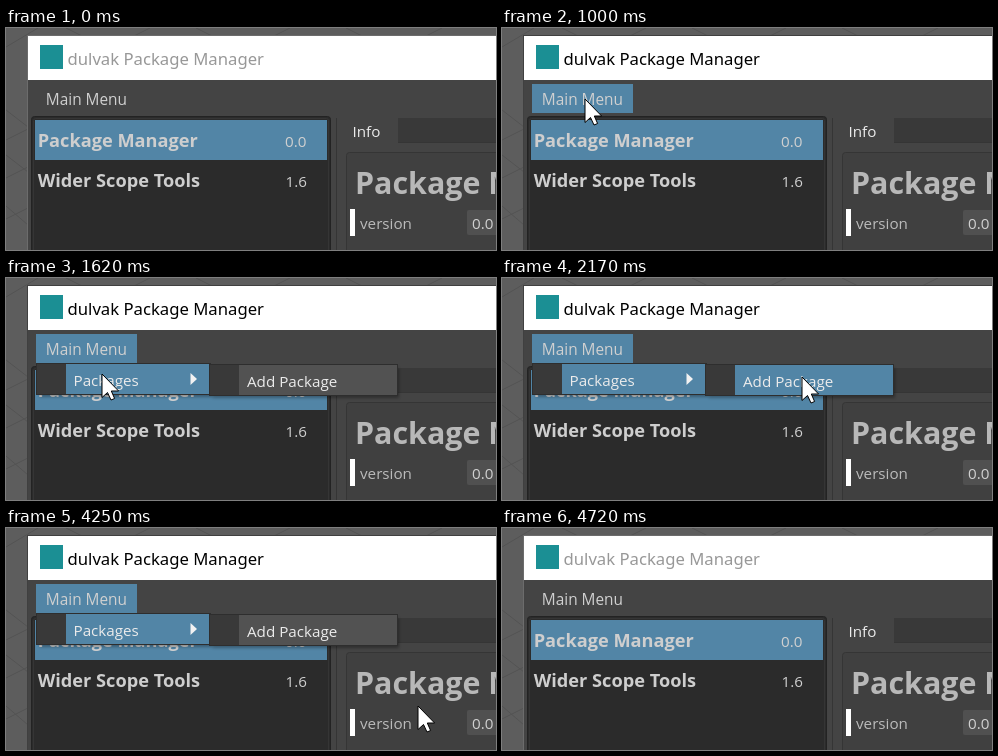
An HTML page that plays this animation: 490 px wide and 222 px high, repeating every 4800 ms.

```html
<!DOCTYPE html>
<html lang="en">
<head>
<meta charset="utf-8">
<title>Package Manager menu</title>
<style>
  html, body { margin: 0; width: 100%; height: 100%; overflow: hidden; background: #5d5d5d; }
  svg { display: block; width: 100vw; height: 100vh; }
  text { font: 15.2px "Open Sans", "Noto Sans", sans-serif; fill: #d0d0d0; white-space: pre; }
  .title { font: 16.7px "Noto Sans", "Open Sans", sans-serif; fill: #989898; }
  .row { font-size: 18.2px; font-weight: 700; fill: #cecece; }
  .head { font-size: 30.4px; font-weight: 700; fill: #b8b8b8; }
  .lit { fill: #ebebeb; }
  .blue { fill: #5285a6; }
  .menu { fill: #525252; }
  .gutter { fill: #393939; }
  .edge { fill: none; stroke: #353535; }
  .shade { fill: #000; opacity: .3; filter: blur(1.5px); }

  /* every state switches hard, once per 4.8 s loop */
  .hover, .focus, .open, .pick, .sub, .add, #cursor {
    animation: 4.8s step-end infinite;
  }
  .hover, .focus, .open, .pick, .sub, .add { opacity: 0; }
  .hover { animation-name: hover; }
  .focus { animation-name: focus; }
  .open  { animation-name: open; }
  .pick  { animation-name: pick; }
  .sub   { animation-name: sub; }
  .add   { animation-name: add; }
  #cursor { animation-name: move; }

  @keyframes hover { 0%, 96.87% { opacity: 0 } 14.37% { opacity: 1 } }
  @keyframes focus { 0%, 98.33% { opacity: 0 } 20.83% { opacity: 1 } }
  @keyframes open  { 0%, 96.87% { opacity: 0 } 22.29% { opacity: 1 } }
  @keyframes pick  { 0%, 96.87% { opacity: 0 } 32.08% { opacity: 1 } }
  @keyframes sub   { 0%, 96.87% { opacity: 0 } 33.74% { opacity: 1 } }
  @keyframes add   { 0%, 88.54% { opacity: 0 } 43.74% { opacity: 1 } }
  @keyframes move {
    0%     { transform: translate(110px, 240px) }
    11.04% { transform: translate(104px, 197px) }
    12.70% { transform: translate(98px, 122px) }
    14.37% { transform: translate(93px, 80px) }
    17.49% { transform: translate(90px, 77px) }
    19.16% { transform: translate(85px, 72px) }
    20.83% { transform: translate(83px, 71px) }
    30.62% { transform: translate(83px, 75px) }
    32.08% { transform: translate(88px, 88px) }
    33.74% { transform: translate(96px, 96px) }
    40.41% { transform: translate(112px, 97px) }
    42.08% { transform: translate(168px, 99px) }
    43.74% { transform: translate(244px, 100px) }
    45.20% { transform: translate(300px, 99px) }
    46.87% { transform: translate(324px, 100px) }
    49.99% { transform: translate(331px, 101px) }
    51.66% { transform: translate(350px, 103px) }
    53.12% { transform: translate(366px, 105px) }
    54.79% { transform: translate(375px, 106px) }
    88.54% { transform: translate(412px, 178px) }
    90.20%, 100% { transform: translate(110px, 240px) }
  }
</style>
</head>
<body>
<svg viewBox="0 0 490 222">
  <!-- viewport floor behind the window -->
  <rect width="490" height="222" fill="#5d5d5d"/>
  <path d="M0 19 32 0M0 82 22 99M0 112 22 101M0 127 22 144M0 150 22 139M0 191 22 180M0 178 22 197M60 0 76 8M128 8 144 0M190 0 206 8M268 8 284 0M340 0 356 8M420 8 436 0"
        fill="none" stroke="#535353"/>

  <!-- window -->
  <rect x="21" y="7" width="469" height="215" fill="#6c6c6c"/>
  <rect class="focus" x="21" y="7" width="469" height="215" fill="#404040"/>
  <rect x="22" y="8" width="468" height="214" fill="#444"/>
  <rect x="22" y="8" width="468" height="44" fill="#fff"/>
  <rect x="34" y="17" width="23" height="24" fill="#1b8f94"/>
  <text class="title" x="61.5" y="37">dulvak Package Manager</text>
  <g class="focus">
    <rect x="60" y="18" width="215" height="28" fill="#fff"/>
    <text class="title" x="61.5" y="37" style="fill:#000">dulvak Package Manager</text>
  </g>

  <!-- package list -->
  <rect x="25.5" y="88.5" width="299" height="140" rx="3" fill="#2b2b2b" stroke="#232323"/>
  <rect class="edge" x="27.5" y="90.5" width="295" height="140" rx="2"/>
  <rect class="blue" x="29" y="92" width="292" height="40"/>
  <text class="row" x="31.7" y="119">Package Manager</text>
  <text x="279" y="119">0.0</text>
  <text class="row" x="31.7" y="159">Wider Scope Tools</text>
  <text x="279.5" y="159">1.6</text>

  <!-- info tab -->
  <rect x="392" y="90" width="98" height="24" fill="#393939"/>
  <path class="edge" d="M330.5 222V90M392 114.5H490"/>
  <text class="lit" x="346.5" y="109">Info</text>
  <rect class="edge" x="340.5" y="124.5" width="170" height="120" rx="3" style="fill:#404040"/>
  <text class="head" x="349" y="166">Package Manager</text>
  <rect x="344" y="181" width="5" height="27" fill="#fff"/>
  <text x="354" y="201" style="fill:#bbb">version</text>
  <rect x="461" y="182" width="60" height="25" rx="2" fill="#505050"/>
  <text x="466" y="201">0.0</text>

  <!-- menu bar -->
  <rect class="blue hover" x="30" y="56" width="101" height="29"/>
  <text x="39.8" y="77" style="font-size:15.4px">Main Menu</text>

  <!-- menu -->
  <g class="open">
    <rect class="shade" x="34" y="89" width="173" height="30"/>
    <rect x="30" y="85" width="175" height="32" fill="#2e2e2e"/>
    <rect class="gutter" x="31" y="86" width="29" height="30"/>
    <rect class="menu" x="60" y="86" width="144" height="30"/>
    <rect class="blue pick" x="60" y="86" width="143" height="30"/>
    <text class="lit" x="67.5" y="108">Packages</text>
    <path d="M184.5 95 191 101 184.5 107Z" fill="#f2f2f2"/>
  </g>

  <!-- submenu -->
  <g class="sub">
    <rect class="shade" x="207" y="90" width="186" height="30"/>
    <rect x="203" y="86" width="189" height="32" fill="#2e2e2e"/>
    <rect class="gutter" x="204" y="87" width="29" height="30"/>
    <rect class="menu" x="233" y="87" width="158" height="30"/>
    <rect class="blue add" x="233" y="87" width="158" height="30"/>
    <text class="lit" x="241" y="109">Add Package</text>
  </g>

  <path id="cursor" d="M0 0V23.5L5.5 18.5 9 26 12.6 24.5 9.3 17H16.6Z"
        fill="#fff" stroke="#000"/>
</svg>
</body>
</html>
```
